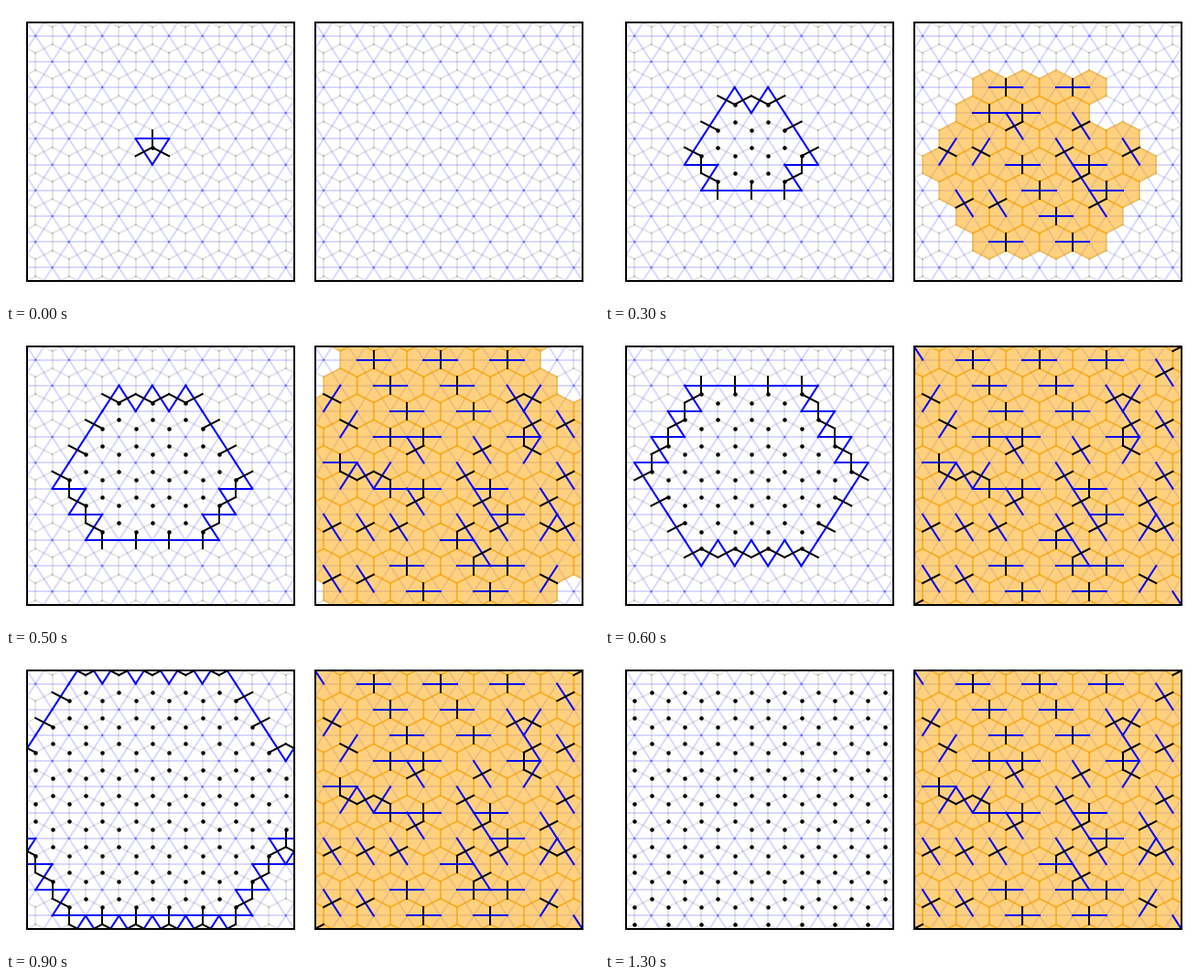
A matplotlib script that plays this animation: 648x324 px, repeating every 1.5 s.

```python
import matplotlib.pyplot as plt
from matplotlib.animation import FuncAnimation
from matplotlib.collections import LineCollection, PolyCollection

# Torus in half-column / row units; a vertex sits at (x, y) when x + y is even,
# a triangle (x, y) is centred on column x between rows y and y + 1.
WIDTH, HEIGHT = 648, 324
COLS, ROWS = 16, 10
LAST_STEP = 13
START = (7, 4)
MOVES = {"e": (2, 0), "s": (1, 1), "z": (-1, 1)}
HEXAGON = [(0, -2/3), (1, -1/3), (1, 1/3), (0, 2/3), (-1, 1/3), (-1, -1/3)]

# Pairs of cells joined at each step: first cell and the walk to its partner.
PAIRINGS = {
    1: [(6, 4, "e"), (5, 5, "e"), (6, 6, "e")],
    2: [(5, 3, "e"), (9, 3, "s"), (4, 4, "z"), (9, 5, "e"), (4, 6, "s"),
        (7, 7, "e")],
    3: [(4, 2, "e"), (8, 2, "e"), (3, 3, "esess"), (12, 6, "ws"),
        (2, 4, "z"), (2, 6, "s"), (4, 8, "e"), (8, 8, "e"), (12, 4, "s")],
    4: [(3, 1, "e"), (7, 1, "e"), (11, 1, "s"), (2, 2, "z"), (11, 3, "e"),
        (0, 4, "esesesse"), (14, 4, "s"), (14, 6, "z"), (0, 6, "s"),
        (2, 8, "s"), (5, 9, "e"), (9, 9, "e")],
    5: [(2, 0, "e"), (6, 0, "e"), (10, 0, "e"), (1, 1, "z"), (14, 2, "s"),
        (13, 1, "zszsss"), (0, 8, "s"), (14, 8, "z")],
    6: [(14, 0, "s"), (15, 9, "s")],
}


def wrap(x, y):
    return x % COLS, y % ROWS


def centre(x, y):
    return x, y + (1/3 if (x + y) % 2 else 2/3)


def triangles(edge):
    """The two triangles on either side of an edge."""
    x, y, move = edge
    if move == "e":
        return (x + 1, y - 1), (x + 1, y)
    return (x, y), (x + MOVES[move][0], y)


def primal(edge):
    x, y, move = edge
    dx, dy = MOVES[move]
    return [(x, y), (x + dx, y + dy)]


def dual(edge):
    return [centre(*t) for t in triangles(edge)]


def tiled(shapes):
    """Repeat shapes across the periodic border, keeping those near the view."""
    copies = []
    for shape in shapes:
        for ox in (-COLS, 0, COLS):
            for oy in (-ROWS, 0, ROWS):
                moved = [(x + ox, y + oy) for x, y in shape]
                if any(-2 < x < COLS + 1 and -2 < y < ROWS + 1
                       for x, y in moved):
                    copies.append(moved)
    return copies


def distances():
    dist, queue = {START: 0}, [START]
    for x, y in queue:
        vertical = y - 1 if (x + y) % 2 else y + 1
        for near in (wrap(x - 1, y), wrap(x + 1, y), wrap(x, vertical)):
            if near not in dist:
                dist[near] = dist[x, y] + 1
                queue.append(near)
    return dist


def matching(step):
    """Cells paired so far and the edges walked an odd number of times."""
    cells, edges = set(), set()
    for when, pairs in PAIRINGS.items():
        if when > step:
            break
        for x, y, walk in pairs:
            cells.add((x, y))
            for move in walk:
                if move == "w":
                    x, y = wrap(x - 2, y)
                    edges ^= {(x, y, "e")}
                else:
                    edges ^= {(x, y, move)}
                    dx, dy = MOVES[move]
                    x, y = wrap(x + dx, y + dy)
            cells.add((x, y))
    return sorted(cells), sorted(edges)


DIST = distances()
EDGES = [(x, y, m) for y in range(ROWS) for x in range(COLS)
         if (x + y) % 2 == 0 for m in MOVES]


def boundary(step):
    return [e for e in EDGES
            if len({DIST[wrap(*t)] <= step for t in triangles(e)}) == 2]


def add_lines(ax, color, alpha, zorder, segments=()):
    lines = LineCollection(segments, colors=color, alpha=alpha, linewidths=2,
                           capstyle="projecting", zorder=zorder)
    ax.add_collection(lines, autolim=False)
    return lines


def make_panel(left):
    ax = fig.add_axes([left / WIDTH, 1 - 300.6 / HEIGHT,
                       291.6 / WIDTH, 282.2 / HEIGHT])
    ax.set(xlim=(-0.5, COLS - 0.5), ylim=(ROWS - 0.5, -0.5),
           xticks=[], yticks=[])
    for spine in ax.spines.values():
        spine.set_linewidth(2)
    add_lines(ax, "blue", 0.15, 1, tiled(map(primal, EDGES)))
    add_lines(ax, "black", 0.1, 1.1, tiled(map(dual, EDGES)))
    return ax, add_lines(ax, "blue", 1, 2), add_lines(ax, "black", 1, 2.1)


def show_edges(blue, black, edges):
    blue.set_segments(tiled(map(primal, edges)))
    black.set_segments(tiled(map(dual, edges)))


fig = plt.figure(figsize=(WIDTH / 72, HEIGHT / 72), dpi=72, facecolor="white")
ball_ax, ball_blue, ball_black = make_panel(23.2)
pair_ax, pair_blue, pair_black = make_panel(338.0)
dots, = ball_ax.plot([], [], "o", color="black", ms=4.5, mew=0, zorder=2.2)
hexes = PolyCollection([], facecolors="orange", edgecolors="orange",
                       alpha=0.5, linewidths=1.5, zorder=1.5)
pair_ax.add_collection(hexes, autolim=False)


def update(frame):
    step = min(frame, LAST_STEP)
    visited = [centre(*t) for t, d in DIST.items() if d <= step]
    dots.set_data(*zip(*visited))
    show_edges(ball_blue, ball_black, boundary(step))

    cells, edges = matching(step)
    hexes.set_verts(tiled([(x + dx, y + dy) for dx, dy in HEXAGON]
                          for x, y in cells))
    show_edges(pair_blue, pair_black, edges)
    return dots, hexes, ball_blue, ball_black, pair_blue, pair_black


anim = FuncAnimation(fig, update, frames=15, interval=100, repeat=True,
                     repeat_delay=0, blit=False)
plt.show()
```
